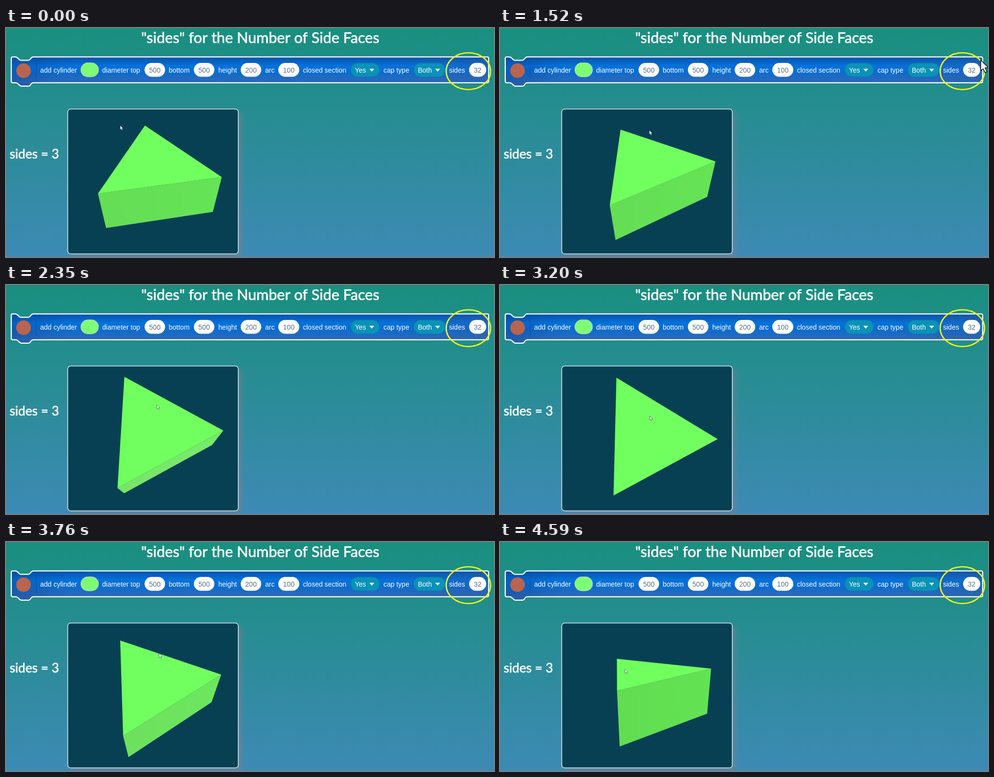
These frames come from a looping animation (1000 by 472 pixels, 4670 ms). An HTML page with a canvas:

```html
<!DOCTYPE html>
<html lang="en">
<head>
<meta charset="utf-8">
<title>Number of side faces</title>
<style>
  html, body { margin: 0; width: 100%; height: 100%; overflow: hidden; background: #2d8c98; }
  canvas { display: block; }
</style>
</head>
<body>
<canvas id="stage" width="1000" height="472"></canvas>
<script>
const ctx = document.getElementById('stage').getContext('2d');
const LOOP = 4670, START = 680, STEP = 69.82;
const LABEL_FONT = '14px "Liberation Sans", Arial, sans-serif';

// step, yaw, pitch (degrees), pointer x, pointer y
const POSES = [
  [-1, 19.5, 45, 234, 201],
  [7, 0, 45, 306, 211],
  [12, 0, 44.3, 306, 211],
  [24, 1.1, 72.8, 309, 247],
  [33, 1.4, 90, 307, 270],
  [36, 1.4, 90, 307, 270],
  [40, -2.9, 75.9, 312, 252],
  [47, -6.8, 39, 314, 215],
  [48, -7, 31.2, 314, 212],
  [50, -6.9, 27.2, 314, 213],
  [56, -6.7, 21, 256, 262]
];

// step, x, y of the large pointer
const VISITOR = [
  [4, 934, 439], [5, 961, 128], [6, 985, 70], [7, 985, 70], [8, 985, 67],
  [12, 985, 66], [13, 977, 95], [14, 953, 352], [15, 928, 402], [16, 935, 452]
];

const ARROW = [[0, 0], [0, 22], [5, 18], [9, 26], [13, 24], [9, 16], [16, 16]];

// Monotone cubic interpolation of one column of a key table
function sample(keys, col, at) {
  const last = keys.length - 1;
  if (at <= keys[0][0]) return keys[0][col];
  if (at >= keys[last][0]) return keys[last][col];
  const secant = i => (keys[i + 1][col] - keys[i][col]) / (keys[i + 1][0] - keys[i][0]);
  const slope = i => {
    if (i === 0 || i === last) return 0;
    const a = secant(i - 1), b = secant(i);
    return a * b > 0 ? 2 * a * b / (a + b) : 0;
  };
  const i = keys.findIndex(k => k[0] > at) - 1;
  const span = keys[i + 1][0] - keys[i][0];
  const u = (at - keys[i][0]) / span, v = 1 - u;
  return keys[i][col] * v * v * (1 + 2 * u) + keys[i + 1][col] * u * u * (3 - 2 * u)
    + span * u * v * (slope(i) * v - slope(i + 1) * u);
}

function gradient(x0, y0, x1, y1, ...stops) {
  const g = ctx.createLinearGradient(x0, y0, x1, y1);
  stops.forEach(([pos, color]) => g.addColorStop(pos, color));
  return g;
}

function polygon(points, fill) {
  ctx.beginPath();
  points.forEach(([x, y]) => ctx.lineTo(x, y));
  ctx.closePath();
  ctx.fillStyle = fill;
  ctx.fill();
}

function box(x, y, w, h, r, fill, stroke, lineWidth = 1) {
  ctx.beginPath();
  ctx.roundRect(x, y, w, h, r);
  ctx.fillStyle = fill;
  ctx.fill();
  if (stroke) {
    ctx.strokeStyle = stroke;
    ctx.lineWidth = lineWidth;
    ctx.stroke();
  }
}

function text(str, x, y, font, color = '#fff', align = 'left') {
  ctx.font = font;
  ctx.fillStyle = color;
  ctx.textAlign = align;
  ctx.fillText(str, x, y);
}

// White text with a slightly thickened pen
function heading(str, x, y, size, align) {
  text(str, x, y, `${size}px Lato, sans-serif`, '#fff', align);
  ctx.strokeStyle = '#fff';
  ctx.lineWidth = .7;
  ctx.lineJoin = 'round';
  ctx.strokeText(str, x, y);
}

function arrow(x, y, scale, outline) {
  ctx.save();
  ctx.translate(x, y);
  ctx.scale(scale, scale);
  polygon(ARROW, '#fff');
  ctx.strokeStyle = outline;
  ctx.lineWidth = 1.5;
  ctx.stroke();
  ctx.restore();
}

function blockPath() {
  const left = 10.8, right = 989, top = 59.6, bottom = 112.8, drop = 7;
  ctx.beginPath();
  ctx.moveTo(left, top + 3);
  ctx.quadraticCurveTo(left, top, left + 3, top);
  ctx.lineTo(19, top);
  ctx.bezierCurveTo(25, top, 25, top + drop, 31, top + drop);
  ctx.lineTo(45, top + drop);
  ctx.bezierCurveTo(51, top + drop, 50, top, 56, top);
  ctx.lineTo(right - 3, top);
  ctx.quadraticCurveTo(right, top, right, top + 3);
  ctx.lineTo(right, bottom - 3);
  ctx.quadraticCurveTo(right, bottom, right - 3, bottom);
  ctx.lineTo(56, bottom);
  ctx.bezierCurveTo(50, bottom, 51, bottom + drop, 46, bottom + drop);
  ctx.lineTo(32, bottom + drop);
  ctx.bezierCurveTo(26, bottom + drop, 26, bottom, 20, bottom);
  ctx.lineTo(left + 3, bottom);
  ctx.quadraticCurveTo(left, bottom, left, bottom - 3);
  ctx.closePath();
}

function field(value, x, w) {
  box(x, 72, w, 28.5, 14.25, '#fff');
  text(value, x + w / 2, 91.5, LABEL_FONT, '#577085', 'center');
}

function dropdown(value, x, w) {
  box(x + .5, 72.5, w - 1, 28, 14, '#0a92b8', '#0b7fa8');
  text(value, x + 9, 91.5, LABEL_FONT);
  const mid = x + w - 16.5;
  polygon([[mid - 5, 84], [mid + 5, 84], [mid, 90]], '#fff');
}

function drawBlock() {
  blockPath();
  ctx.fillStyle = gradient(0, 60, 0, 113,
    [0, '#0752ab'], [.35, '#0572da'], [.6, '#0b6ccf'], [1, '#3369b4']);
  ctx.fill();
  ctx.fillStyle = gradient(11, 0, 989, 0,
    [0, 'rgba(10,60,140,.35)'], [.12, 'rgba(10,60,140,0)'],
    [.8, 'rgba(50,90,160,0)'], [1, 'rgba(50,90,160,.4)']);
  ctx.fill();
  ctx.strokeStyle = '#fff';
  ctx.lineWidth = 2.3;
  ctx.stroke();

  ctx.beginPath();
  ctx.arc(36, 88, 15, 0, 2 * Math.PI);
  ctx.fillStyle = '#b9644f';
  ctx.fill();
  ctx.fillStyle = 'rgba(10,70,150,.6)';
  ctx.fillRect(61.5, 68, 1, 37);

  [['add cylinder', 70], ['diameter top', 197], ['bottom', 333.5], ['height', 435],
   ['arc', 531], ['closed section', 608.5], ['cap type', 773.5], ['sides', 908]]
    .forEach(([label, x]) => text(label, x, 91.5, LABEL_FONT));
  box(153.5, 72, 36, 28.5, 14.25, '#7dfd74', '#b9d2bb', 1.3);
  field('500', 284, 42);
  field('500', 385, 42);
  field('200', 481, 42);
  field('100', 558, 43);
  field('32', 949, 35);
  dropdown('Yes', 706, 60);
  dropdown('Both', 835, 66);

  ctx.beginPath();
  ctx.ellipse(947.5, 89, 45.5, 38, 0, 0, 2 * Math.PI);
  ctx.strokeStyle = '#f9fb06';
  ctx.lineWidth = 2.6;
  ctx.stroke();
}

function drawPanel() {
  ctx.save();
  ctx.shadowColor = 'rgba(120,125,140,.6)';
  ctx.shadowBlur = 8;
  ctx.shadowOffsetX = ctx.shadowOffsetY = 7;
  box(126.5, 167, 349.5, 298.5, 6, '#074053');
  ctx.restore();
  box(126.5, 167, 349.5, 298.5, 6, '#074053', '#cfe9ee', 1.6);
}

// Three-sided cylinder seen through an orbiting perspective camera
function drawPrism(yaw, pitch) {
  const rad = Math.PI / 180;
  const sin = Math.sin(pitch * rad), cos = Math.cos(pitch * rad);
  const radius = 250, half = 100, distance = 1045, focal = 530;
  const corner = (turn, z) => {
    const a = (yaw + turn) * rad;
    const x = radius * Math.cos(a), near = radius * Math.sin(a);
    const k = focal / (distance - near * cos - z * sin);
    return [305.7 + x * k, 314 - (z * cos - near * sin) * k];
  };
  const right = corner(0, half), front = corner(120, half), back = corner(-120, half);
  const lowRight = corner(0, -half), lowFront = corner(120, -half);

  const glow = Math.max(0, (pitch - 40) / 36);
  const shade = lift => `rgb(${98 + 24 * glow},${220 + lift + 9 * glow},${82 + 26 * glow})`;
  polygon([front, right, lowRight, lowFront],
    gradient(front[0], 0, right[0], 0, [0, shade(0)], [1, shade(7)]));
  polygon([back, right, front], '#70ff5e');
}

function draw(time) {
  const step = Math.floor((time - START + 8) / STEP);
  ctx.fillStyle = gradient(0, 0, 0, 472, [0, '#198f7f'], [.5, '#2b8c98'], [1, '#3d8ab5']);
  ctx.fillRect(0, 0, 1000, 472);

  heading('"sides" for the Number of Side Faces', 521, 31, 30.6, 'center');
  heading('sides = 3', 7.5, 269, 26.2, 'left');
  drawBlock();
  drawPanel();

  const [yaw, pitch, x, y] = [1, 2, 3, 4].map(col => sample(POSES, col, step));
  drawPrism(yaw, pitch);
  arrow(x, y, .38, '#10333f');

  if (step >= VISITOR[0][0] && step <= VISITOR[VISITOR.length - 1][0]) {
    arrow(sample(VISITOR, 1, step), sample(VISITOR, 2, step), 1, '#111');
  }
}

const origin = performance.now();
function tick() {
  draw((performance.now() - origin) % LOOP);
  requestAnimationFrame(tick);
}
tick();
</script>
</body>
</html>
```
